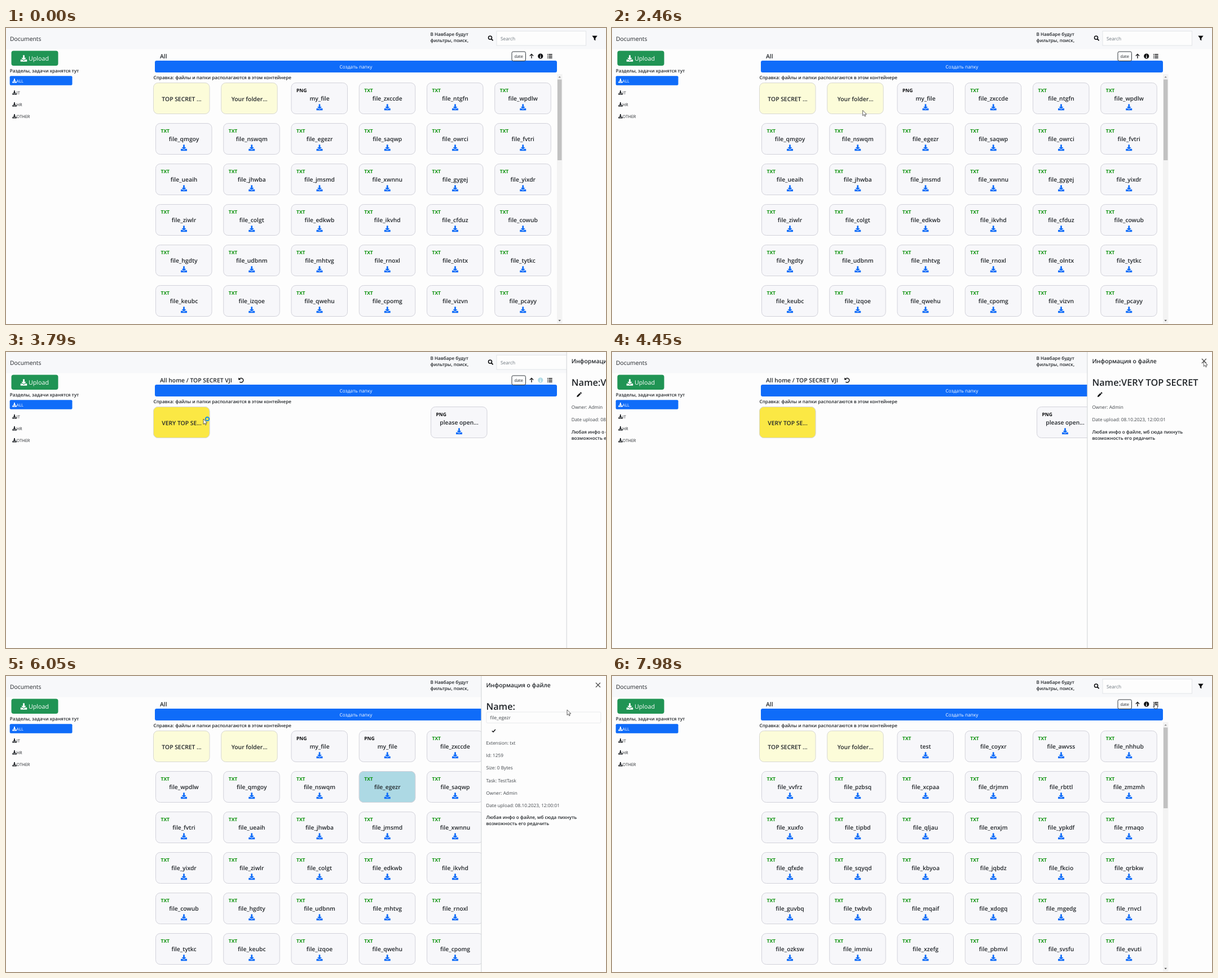
An HTML page for the animation above (8000 ms loop, 1064x526 px).

```html
<!DOCTYPE html>
<html lang="ru">
<head>
<meta charset="utf-8">
<title>Documents</title>
<style>
  html, body { margin: 0; width: 100%; height: 100%; overflow: hidden; background: #fdfdfd; }
  svg { display: block; width: 1064px; height: 526px; }
  text { font-family: "Open Sans", "Noto Sans", sans-serif; text-rendering: geometricPrecision; white-space: pre; }
</style>
</head>
<body>
<svg id="stage" viewBox="0 0 1064 526"></svg>
<script>
const LOOP = 8000;
const INK = '#212529', BLUE = '#0f6cf9', GREEN = '#0a910a', BLACK = '#0b0c0e';
const PALE = '#fcfcd9', YELLOW = '#fbe844', SKY = '#add9e4', GREY = '#f7f7fa';
const STAGE = document.getElementById('stage');

// ---------- drawing helpers ----------
const rect = (x, y, w, h, fill, rx = 0, stroke = 'none') =>
  `<rect x="${x}" y="${y}" width="${w}" height="${h}" rx="${rx}" fill="${fill}" stroke="${stroke}"/>`;

const text = (s, x, y, size, { fill = INK, weight = 400, anchor = 'start', id = '' } = {}) =>
  `<text ${id && `id="${id}"`} x="${x}" y="${y}" font-size="${size}" font-weight="${weight}" fill="${fill}" text-anchor="${anchor}">${s}</text>`;

const head = (s, x, y) => text(s, x, y, 10.35, { weight: 600 });
const note = (s, x, y) => text(s, x, y, 8.15, { weight: 600 });
const shape = (d, x, y, fill, scale = 1) =>
  `<path d="${d}" transform="translate(${x} ${y}) scale(${scale})" fill="${fill}"/>`;
const line = (d, x, y, width, stroke = BLACK) =>
  `<path d="${d}" transform="translate(${x} ${y})" fill="none" stroke="${stroke}" stroke-width="${width}"/>`;
const group = (id, body) => `<g id="${id}">${body}</g>`;

const TRAY = 'M-1-6h2q.5 0 .5.5V-1h2.2q.8 0 .3.7L.5 2.9q-.5.5-1 0L-4-.3q-.5-.7.3-.7h2.2v-4.5q0-.5.5-.5z' +
  'M-5.5 2.2h3L-.9 3.8q.9.7 1.8 0L2.5 2.2h3q.5 0 .5.6v2.6q0 .6-.6.6H-5.4q-.6 0-.6-.6V2.8q0-.6.5-.6z';
const download = (x, y, size, fill) => shape(TRAY, x, y, fill, size / 12);

const undo = x => line('M-3.4-1.6A3.8 3.8 0 1 1-2.6 2.8', x, 50.2, 1.4) +
  shape('M-4.8-4.8V-.6H-.6z', x, 50.2, BLACK);

// ---------- cards ----------
const colX = c => 265.5 + 120.25 * c;

function fileCard(name, x, row, fill = GREY) {
  const y = 97.5 + 72 * row;
  const png = !/^(file_|test)/.test(name);
  return rect(x, y, 99.5, 55, fill, 8, '#d2d2da') +
    text(png ? 'PNG' : 'TXT', x + 9, y + 16, 8.5, { weight: 700, fill: png ? BLACK : GREEN }) +
    text(name, x + 50, y + 31.3, 10.3, { weight: 600, anchor: 'middle' }) +
    download(x + 50, y + 43.3, 11, BLUE);
}

const folderCard = (name, x, fill = PALE) =>
  rect(x, 97.5, 99.5, 55, fill, 8, '#d8d8d2') +
  text(name, x + 50, 130, 10.35, { weight: 600, anchor: 'middle' });

const scrollbar = () =>
  rect(977, 82, 9.5, 443, '#f3f3f3') + rect(978, 91.5, 7.5, 143.5, '#c1c1c1') +
  shape('M-2.2 1.2L0-1.2 2.2 1.2z', 981.7, 87, '#8a8a8a') +
  shape('M-2.2-1.2L0 1.2 2.2-1.2z', 981.7, 520, '#505050');

// Two folders come first, then files fill a grid six wide.
const listing = names => head('All', 273, 54) +
  folderCard('TOP SECRET ...', 261.5) + folderCard('Your folder...', 381.7) +
  names.map((n, i) => fileCard(n, colX((i + 2) % 6), Math.floor((i + 2) / 6))).join('') +
  scrollbar();

const files = codes => codes.split(' ').map(c => 'file_' + c);

const newest = files('zxccde ntgfn wpdlw qmgoy nswqm egezr saqwp owrci fvtri ueaih jhwba jmsmd ' +
  'xwnnu gygej yixdr ziwlr colgt edkwb ikvhd cfduz cowub hgdty udbnm mhtvg rnoxl olntx tytkc ' +
  'keubc izqoe qwehu cpomg vizvn pcayy');
const oldest = files('coyxr awvss nhhub vvfrz pzbsq xcpaa drjmm rbttl zmzmh xuxfo tipbd qljau ' +
  'enxjm ypkdf rmaqo qfxde sqyqd kbyoa jqbdz fkcio qrbkw guvbq twbvb mqaif xdogq mgedg rnvcl ' +
  'ozksw immiu xzefg pbmvl svsfu evuti');

const scenes = {
  list: listing(['my_file', ...newest]),
  dreams: head('All home / Your folder of dreams', 273, 54) + undo(446) +
    text('Здесь еще нет файлов', 261.5, 115, 16.3, { weight: 600 }),
  secret: head('All home / TOP SECRET VJI', 273, 54) + undo(417) +
    folderCard('VERY TOP SE...', 261.5) + fileCard('please open...', 753.5, 0),
  updated: listing(['my_file', 'my_file', ...newest.slice(0, -1)]),
  sorted: listing(['test', ...oldest]),
};

// ---------- page frame ----------
const sideItem = (name, i) =>
  download(15, 93.8 + 21 * i, 7.6, i ? INK : '#fff') +
  text(name, 18.6, 96.5 + 21 * i, 7.4, { fill: i ? INK : '#fff' });

const page = rect(0, 0, 1064, 526, '#fdfdfd') + rect(0, 0, 1064, 37.5, '#f7f8fa') +
  text('Documents', 7, 22.5, 10.35) +
  note('В Навбаре будут', 752.5, 14.2) + note('фильтры, поиск,', 752.5, 24.8) +
  `<circle cx="858.5" cy="17.2" r="3" fill="none" stroke="${BLACK}" stroke-width="1.5"/>` +
  line('M0 0L3 3', 860.6, 19.3, 1.9) +
  rect(870, 5.5, 158.5, 25.5, '#fdfdfd', 0, '#e2e5e8') +
  text('Search', 877, 21.5, 8.3, { fill: '#6c757d' }) +
  shape('M-4.7-4.2H4.7L1.3.2V4.6L-1.3 2.8V.2z', 1044, 18, BLACK) +
  rect(9.5, 40.5, 83, 26.5, '#209454', 4) + download(31.5, 54, 11.5, '#fff') +
  text('Upload', 40, 58.3, 10.7, { fill: '#fff' }) +
  note('Разделы, задачи хранятся тут', 6.7, 78.5) +
  rect(6.7, 85.3, 110.8, 16.5, BLUE, 2) + ['ALL', 'IT', 'HR', 'OTHER'].map(sideItem).join('') +
  rect(264, 58, 713, 21, BLUE, 3) +
  text('Создать папку', 620.5, 72, 8.3, { fill: '#fff', anchor: 'middle' }) +
  note('Справка: файлы и папки располагаются в этом контейнере', 261.5, 91) +
  rect(897, 42, 24.5, 16.5, '#fdfdfd', 2.5, '#343a40') +
  text('date', 909.2, 53, 7.3, { anchor: 'middle' }) +
  line('M0 4V-3.4M-3.2-.4L0-3.6 3.2-.4', 932, 50, 1.3) +
  `<circle id="info" cx="947.8" cy="50" r="4.6"/>` +
  line('M0-2.6V-1.2M0-.4V2.6M-1.2 2.4H1.2', 947.8, 50, 1.2, '#fff') +
  line('M-2-3H4.4M-2 0H4.4M-2 3H4.4M-4.4-3H-3M-4.4 0H-3M-4.4 3H-3', 964.3, 50, 1.3);

// ---------- side panel, drawn from its own left edge ----------
const details = ['Extension: txt', 'Id: 1259', 'Size: 0 Bytes', 'Task: TestTask'];
const owner = ['Owner: Admin', 'Date upload: 08.10.2023, 12:00:01'];

function facts(lines, y) {
  const end = y + 22.1 * lines.length;
  return lines.map((s, i) => text(s, 9, y + 22.1 * i, 8.25, { fill: '#40454a' })).join('') +
    note('Любая инфо о файле, мб сюда пихнуть', 9, end - .5) +
    note('возможность его редачить', 9, end + 10.2);
}
const title = (s, id) => text(s, 9, 59.8, 16.3, { weight: 600, id });
const pencil = shape('M-4 4l.5-2.4L1-2.9 2.9-1-1.6 3.5zM1.6-3.5l1-.9q.5-.4 1 0l.8.9q.5.5 0 1l-.9.9z', 22.5, 76, BLACK);

const panel = rect(.5, -1, 224, 528, '#fdfdfd', 0, '#d0d2d5') +
  head('Информация о файле', 9, 20.4) +
  line('M-4-4L4 4M4-4L-4 4', 207.5, 16, 1.1, '#444') +
  group('folderInfo', title('Name:VERY TOP SECRET', '') + pencil + facts(owner, 101.2)) +
  group('fileInfo', title('', 'fileTitle') + pencil + facts([...details, ...owner], 101.2)) +
  group('fileEdit', title('Name:', '') + rect(9.5, 64, 203, 19.5, '#fdfdfd', 2, '#e9eaec') +
    text('', 16, 76.8, 8.3, { fill: '#40454a', id: 'typed' }) +
    line('M-3 .2L-.9 2.2 3-2.2', 22.5, 97.2, 1.4) +
    facts([...details, ...owner], 122.2));

// ---------- cursors, tip at the origin ----------
const arrow = '<path d="M0 0V9.5L2.2 7.5 3.7 10.8 5.2 10.1 3.8 7H6.8z" fill="#fff" stroke="#222" stroke-width=".7"/>';
const cursors = {
  arrow,
  busy: arrow + '<circle cx="7" cy="0" r="3.2" fill="none" stroke="#1f8fe0" stroke-width="2"/>',
  beam: line('M-2-4.5H2M0-4.5V4.5M-2 4.5H2', 0, 0, 1, '#333'),
  hand: '<path d="M-.9 0Q0-1 .9 0V3.6L4.6 4.6V7.4L3.6 10.2H-.8L-3.2 6.4-2.2 5.6-.9 6.6z" fill="#fff" stroke="#222" stroke-width=".8"/>',
};

STAGE.innerHTML = page +
  Object.entries(scenes).map(([id, body]) => group(id, body)).join('') +
  group('pickedFolder', folderCard('VERY TOP SE...', 261.5, YELLOW)) +
  group('pickedFile', fileCard('file_egezr', colX(3), 1, SKY)) +
  group('panel', panel) +
  group('cursor', Object.entries(cursors).map(([id, body]) => group(id, body)).join(''));

// ---------- timeline ----------
const SCENES = [[0, 'list'], [2660, 'dreams'], [3390, 'list'], [3560, 'secret'], [5190, 'updated'], [7510, 'sorted']];
const PANELS = [[3678, 4560], [5480, 7120]];
const SLIDE = 300;
const EDIT = [5850, 6960];

// time, x, y, kind shown from then on
const PATH = [
  [2300, 470, 200, 'arrow'], [2540, 436, 128, 'arrow'], [2760, 436, 128, 'arrow'],
  [3200, 304, 59, 'beam'], [3400, 304, 59, 'arrow'], [3520, 330, 124, 'arrow'],
  [3640, 350, 119, 'busy'], [3960, 350, 119, 'arrow'], [4460, 1050, 16, 'hand'],
  [4600, 1050, 16, 'arrow'], [5000, 419, 51, 'hand'], [5200, 419, 51, 'arrow'],
  [5420, 680, 198, 'arrow'], [5520, 680, 198, 'arrow'], [5760, 866, 76, 'hand'],
  [5860, 866, 76, 'arrow'], [5980, 995, 60, 'arrow'], [6700, 995, 60, 'arrow'],
  [6900, 866, 97, 'hand'], [6970, 866, 97, 'arrow'], [7090, 1050, 16, 'hand'],
  [7160, 1050, 16, 'arrow'], [7440, 932, 50, 'hand'], [7580, 932, 50, 'arrow'],
  [7840, 963, 48, 'hand'],
];

const el = id => document.getElementById(id);
const show = (id, on) => { el(id).style.display = on ? '' : 'none'; };
const clamp = v => Math.min(1, Math.max(0, v));
const ease = v => v * v * (3 - 2 * v);
const within = (t, [a, b]) => t >= a && t < b;
const current = (rows, t) => rows.filter(r => r[0] <= t).pop();

function inputValue(t) {
  const name = 'file_egezr';
  if (t < 6400) return name.slice(0, name.length - Math.round(10 * clamp((t - 6130) / 240)));
  return 'test'.slice(0, Math.floor((t - 6400) / 70));
}

function drawPanel(t) {
  const open = PANELS.map(([a, b]) => ease(clamp((t - a) / SLIDE)) - ease(clamp((t - b) / SLIDE)));
  const amount = Math.max(...open);
  show('panel', amount > 0);
  el('panel').setAttribute('transform', `translate(${1064.5 - 222.1 * amount} 0)`);

  const editing = within(t, EDIT);
  show('folderInfo', t < 5200);
  show('fileInfo', t >= 5200 && !editing);
  show('fileEdit', editing);
  el('fileTitle').textContent = 'Name:' + (t < EDIT[1] ? 'file_egezr' : 'test');
  el('typed').textContent = inputValue(t);

  show('pickedFolder', within(t, PANELS[0]));
  show('pickedFile', within(t, PANELS[1]));
  el('info').setAttribute('fill', PANELS.some(p => within(t, p)) ? SKY : BLACK);
}

function drawCursor(t) {
  const from = current(PATH, t);
  show('cursor', from);
  if (!from) return;
  const to = PATH[PATH.indexOf(from) + 1] || from;
  const k = to === from ? 0 : ease((t - from[0]) / (to[0] - from[0]));
  const [x, y] = [1, 2].map(i => from[i] + (to[i] - from[i]) * k);
  el('cursor').setAttribute('transform', `translate(${x} ${y})`);
  for (const id in cursors) show(id, id === from[3]);
}

function draw(t) {
  const scene = current(SCENES, t)[1];
  for (const id in scenes) show(id, id === scene);
  drawPanel(t);
  drawCursor(t);
}

const start = performance.now();
function tick() {
  draw((performance.now() - start) % LOOP);
  requestAnimationFrame(tick);
}
tick();
</script>
</body>
</html>
```
